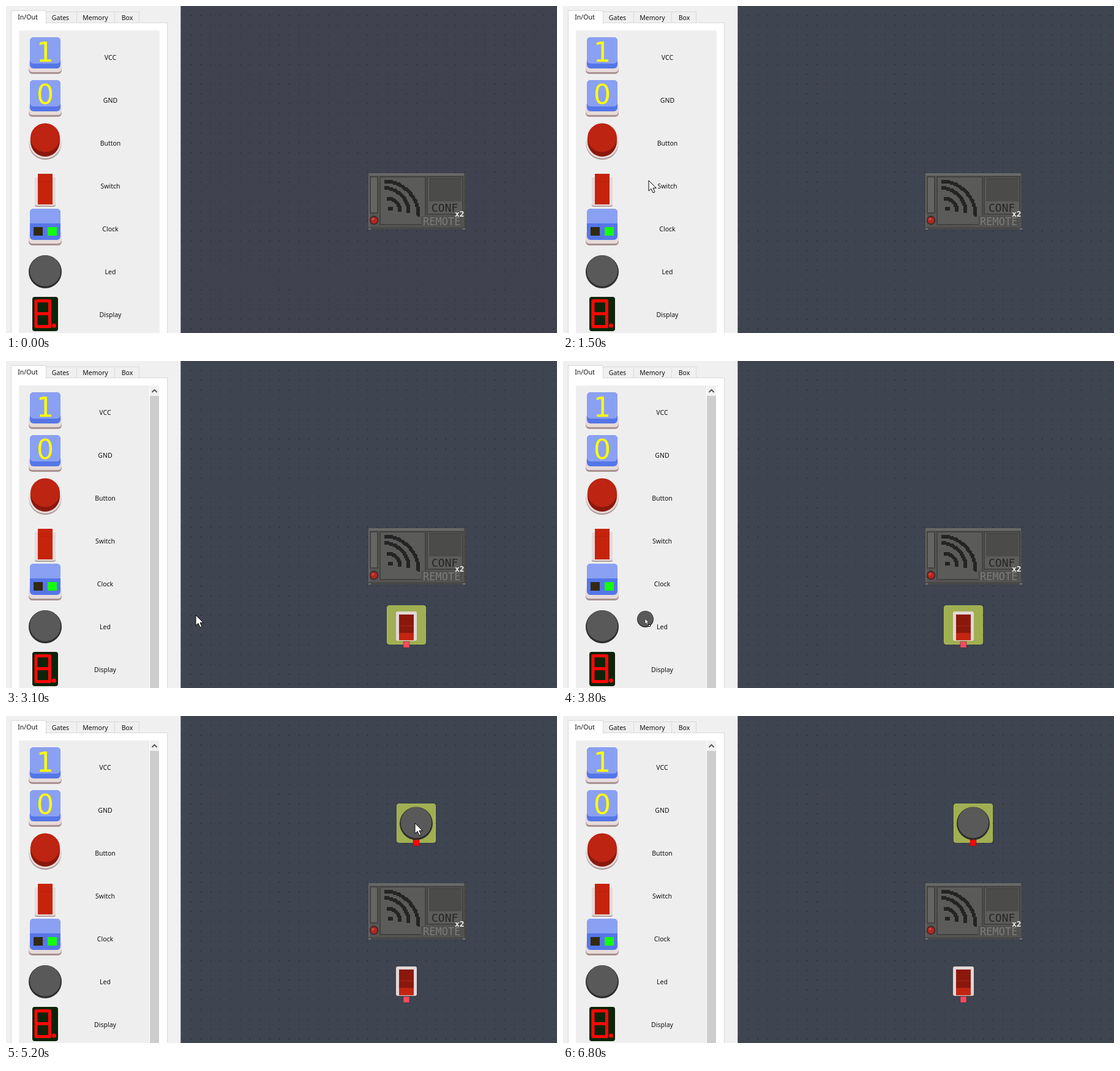
An HTML page for the animation above (6.9 s loop, 900x534 px).

```html
<!DOCTYPE html>
<html lang="en">
<head>
<meta charset="utf-8">
<title>Circuit editor</title>
<style>
  html, body { margin: 0; width: 100%; height: 100%; overflow: hidden; background: #f0f0f0; }
  svg { display: block; width: 900px; height: 534px; }
  .ui { font: 10.5px "Noto Sans", "Open Sans", sans-serif; fill: #111; text-anchor: middle; }
  .digit { font: 44px "DejaVu Sans", sans-serif; fill: #ffff00; text-anchor: middle; }
  .pixel { font-family: "DejaVu Sans Mono", monospace; }
  .crisp { shape-rendering: crispEdges; }
</style>
</head>
<body>
<svg id="stage" viewBox="0 0 900 534"></svg>
<script>
const LOOP = 6900, FRAME = 100;
const stage = document.getElementById('stage');

const rect = (x, y, w, h, fill, rx = 0, extra = '') =>
  `<rect x="${x}" y="${y}" width="${w}" height="${h}" fill="${fill}" rx="${rx}" ${extra}/>`;
const ellipse = (x, y, rx, ry, fill) =>
  `<ellipse cx="${x}" cy="${y}" rx="${rx}" ry="${ry}" fill="${fill}"/>`;
const text = (x, y, s, cls = 'ui', extra = '') =>
  `<text x="${x}" y="${y}" class="${cls}" ${extra}>${s}</text>`;
const group = (id, body, extra = '') => `<g id="${id}" ${extra}>${body}</g>`;
const at = (x, y, body, scale = 1) =>
  `<g transform="translate(${x} ${y}) scale(${scale})">${body}</g>`;

// Icons are drawn around the centre of a 64 px cell.
const block = topHeight =>
  rect(-27, 8, 54, 20, '#a99191', 6) +
  rect(-27, 4, 54, 21, '#e6dada', 6) +
  rect(-25, -32, 50, 51, '#5576e8', 6) +
  rect(-25, -32, 50, topHeight, '#8aa0f2', 6);

const icons = {
  VCC: block(43) + text(0, 7.5, '1', 'digit'),
  GND: block(43) + text(0, 7, '0', 'digit'),
  Button:
    ellipse(0, 2, 26.5, 26, '#a99191') + ellipse(0, 0, 26.5, 26, '#e6dada') +
    `<path d="M-24-8V-2A24 25 0 0 0 24-2V-8Z" fill="#8a180c"/>` +
    ellipse(0, -8, 24, 23.5, '#bd2412'),
  Switch:
    rect(-17, -13, 34, 49 - 1, '#b3a1a1', 3) + rect(-17, -13, 34, 46, '#e6dada', 3) +
    rect(-12, -19, 24, 50, '#c6230d') + rect(-12, -7, 24, 1, '#b52010'),
  Clock:
    block(23) + rect(-25, -14, 50, 6, '#8aa0f2') +
    rect(-19, -2, 15, 14, '#33290d') + rect(4, -2, 15, 14, '#14ff10'),
  Led: ellipse(0, 0, 27, 27, '#2d2d2d') + ellipse(0, -1.5, 25.2, 25.2, '#595959'),
  Display:
    rect(-21, -29, 42, 56, '#0d2409', 4) +
    `<path d="M-15-22.5H7.500V19.500H-15ZM-15-1.500H7.500" fill="none" stroke="#ff0806"
      stroke-width="5" stroke-linejoin="round"/>` + ellipse(14.500, 18, 3.500, 3.500, '#ff0806')
};

function palette() {
  const tabs = [['Gates', 65, 50, 89], ['Memory', 115, 62, 146], ['Box', 177, 40, 198]];
  const line = 'stroke="#d9d9d9"';
  const names = Object.keys(icons);
  return rect(0, 0, 286, 534, '#f0f0f0') +
    rect(8.5, 27.5, 255, 520, '#fff', 0, line) +
    tabs.map(([s, x, w, cx]) =>
      rect(x + .5, 9.5, w, 18, '#f0f0f0', 0, line) + text(cx, 23, s)).join('') +
    rect(8.5, 7.5, 57, 21, '#fff', 0, line) + rect(9, 27, 56, 3, '#fff') +
    text(35.5, 22, 'In/Out') +
    rect(21, 40, 230, 500, '#eee', 2) +
    names.map((n, i) => at(64, 83 + i * 70 + (n === 'Led' || n === 'Display' ? 1 : 0), icons[n])).join('') +
    group('labels', names.map((n, i) => text(170.5, 88 + i * 70, n)).join('')) +
    group('scrollbar',
      rect(234, 40, 17, 494, '#fff') + rect(235, 40, 15, 17, '#f0f0f0') +
      rect(235, 57, 15, 480, '#cdcdcd') +
      '<path d="M238.5 51l4-4 4 4" fill="none" stroke="#505050" stroke-width="1.8"/>');
}

// Concentric waves on the 2 px grid of the remote's artwork.
function waves() {
  const arcs = [[617, 343, 57], [617, 338, 41], [622, 336, 22]];
  let out = '';
  for (let y = 282; y < 344; y += 2)
    for (let x = 616; x < 680; x += 2) {
      const hit = arcs.some(([cx, cy, r]) =>
        x >= cx && y < cy && Math.abs(Math.hypot(x + 1 - cx, y + 1 - cy) - r) < 3);
      if (hit || Math.hypot(x + 1 - 628, y + 1 - 331) < 4) out += `M${x} ${y}h2v2h-2z`;
    }
  return `<path d="${out}" fill="#242424"/>`;
}

function remote() {
  const panel = (x, y, w, h, fill) =>
    rect(x, y, w, h, fill, 0, 'stroke="#434342" stroke-width="2"');
  return `<g class="crisp">` +
    rect(592, 273, 158, 92, '#555554') + rect(592, 273, 158, 4, '#686867') +
    rect(592, 273, 2, 92, '#646463') + rect(748, 273, 2, 92, '#484847') +
    rect(592, 361, 158, 4, '#484847') + rect(592, 363, 4, 2, '#777') + rect(746, 363, 4, 2, '#777') +
    panel(595, 279, 12, 59, '#656564') +
    panel(611, 279, 74, 78, '#5b5b5a') +
    panel(688, 279, 58, 61, '#5c5c5b') +
    rect(691, 281, 53, 38, '#4b4b4a') + rect(691, 281, 53, 2, '#444443') +
    rect(678, 343, 68, 16, '#50504f') + waves() + '</g>' +
    ellipse(601, 350, 7.2, 7.2, '#3c2523') + ellipse(601, 350, 5.6, 5.6, '#b22722') +
    ellipse(599.500, 348, 2, 2, '#d04a43') +
    text(695, 335.5, 'CONF', 'pixel', 'font-size="18" fill="#252525"') +
    text(681, 357.5, 'REMOTE', 'pixel', 'font-size="17" fill="#7c7c7b"') +
    text(733, 343.5, 'x2', 'pixel', 'font-size="13" font-weight="bold" fill="#f0f0f0"');
}

const highlight = (id, x, y) =>
  group(id, rect(x + .5, y + .5, 63, 63, '#a0af52', 3, 'stroke="#acbd51"'));
const pin = (x, y, fill) =>
  rect(x, y, 10, 10, fill, 0, 'stroke="#30202a" stroke-opacity=".5" stroke-width=".8"');

const arrow = '<path d="M0 0V17L4 13.400L7 20L10 18.700L7 12.300H12.300Z" fill="#fff" stroke="#000"/>';
const dragArrow = `<g transform="scale(.48)">${arrow}</g>` +
  rect(5.5, 9.5, 3, 3, '#fff', 0, 'stroke="#111"');

stage.innerHTML =
  '<defs><pattern id="grid" x="286" y="15" width="16" height="16" patternUnits="userSpaceOnUse">' +
  rect(0, 0, 1, 1, '#11141a') + '</pattern></defs>' +
  rect(285, 0, 615, 534, '#3e4450', 0, 'id="board"') + rect(286, 0, 614, 534, 'url(#grid)') +
  palette() + rect(285, 0, 1, 534, '#777a80') + remote() +
  group('switchItem', highlight('switchGlow', 622, 399) +
    rect(637, 409, 34, 48, '#e2d8d8', 3) + rect(642, 414, 24, 42, '#c22511') +
    rect(642, 414, 24, 30, '#8b180c') + rect(642, 432, 24, 1, '#a52719') +
    pin(649, 458, '#fa4b5d')) +
  group('ledItem', highlight('ledGlow', 638, 143) + at(670, 175.5, icons.Led) + pin(665, 202, '#ff0505')) +
  group('dragSwitch', rect(-7, -16, 14, 30, '#111', 2) + at(0, -4, icons.Switch, .5)) +
  group('dragLed', at(0.5, 0.5, icons.Led, .5)) +
  group('pointer', arrow) + group('dragPointer', dragArrow);

const el = id => document.getElementById(id);
const parts = Object.fromEntries(['board', 'labels', 'scrollbar', 'switchItem', 'switchGlow', 'ledItem',
  'dragSwitch', 'dragLed', 'pointer', 'dragPointer'].map(id => [id, el(id)]));
const show = (id, on) => parts[id].setAttribute('visibility', on ? 'inherit' : 'hidden');
const move = (id, [x, y]) => parts[id].setAttribute('transform', `translate(${x} ${y})`);

// time, x, y of the pointer
const path = [
  [400, 836, 518], [700, 520, 400], [1000, 152, 292], [1100, 140, 285], [1600, 140, 285],
  [1900, 390, 350], [2200, 660, 447], [2300, 669, 452], [2600, 669, 452], [2800, 560, 436],
  [3100, 310, 415], [3400, 110, 430], [3700, 66, 434], [4000, 270, 395], [4300, 503, 336],
  [4700, 640, 215], [5000, 668, 175], [5200, 668, 175], [5400, 684, 235], [5800, 684, 235], [6300, 700, 540]
];

function pointerAt(t) {
  const i = path.findIndex(p => p[0] > t);
  if (i < 1) return path[i < 0 ? path.length - 1 : 0].slice(1);
  const [a, b] = [path[i - 1], path[i]];
  const k = (t - a[0]) / (b[0] - a[0]);
  return [1, 2].map(n => Math.round(a[n] + (b[n] - a[n]) * k));
}

function draw(t) {
  const pos = pointerAt(t);
  const draggingSwitch = t >= 1700 && t < 2600;
  const draggingLed = t >= 3800 && t < 5200;
  const dragging = draggingSwitch || draggingLed;
  const switchPlaced = t >= 2600, ledPlaced = t >= 5200;

  parts.board.setAttribute('fill', t < 400 ? '#404250' : '#3e4450');
  show('scrollbar', switchPlaced);
  move('labels', [switchPlaced ? -8.5 : 0, 0]);
  show('switchItem', switchPlaced);
  show('switchGlow', switchPlaced && !ledPlaced);
  show('ledItem', ledPlaced);
  show('dragSwitch', draggingSwitch);
  show('dragLed', draggingLed);
  show('pointer', t >= 400 && t < 6300 && !dragging);
  show('dragPointer', dragging);
  for (const id of ['pointer', 'dragPointer', 'dragSwitch', 'dragLed']) move(id, pos);
}

// switchGlow must inherit from its hidden parent
const start = performance.now();
function tick() {
  const t = Math.max(0, performance.now() - start) % LOOP;
  draw(Math.floor(t / FRAME) * FRAME);
  requestAnimationFrame(tick);
}
tick();
</script>
</body>
</html>
```
